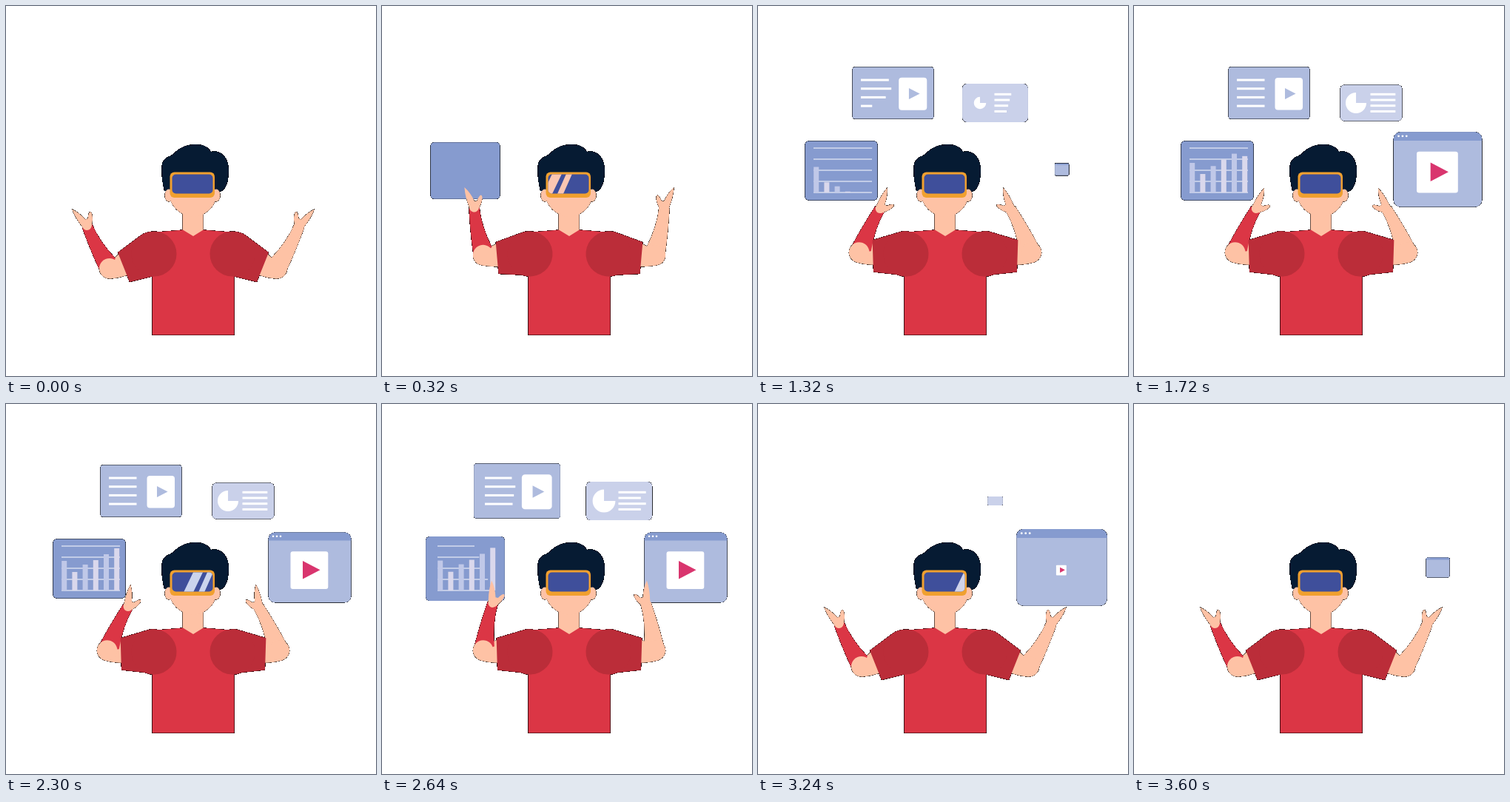
Recreate the animation shown at these times as an HTML page. Size 500 by 500 pixels, loop 3.62 s.

```html
<!DOCTYPE html>
<html lang="en">
<head>
<meta charset="utf-8">
<title>Headset</title>
<style>
html, body { margin: 0; width: 100%; height: 100%; overflow: hidden; background: #fff; }
svg { display: block; width: 100vw; height: 100vh; }
</style>
</head>
<body>
<svg viewBox="0 0 500 500">
  <defs>
    <clipPath id="lens"><rect x="224.5" y="227.5" width="55" height="26" rx="5"/></clipPath>
    <!-- Half-covered edge pixels sit on a hard black mask -->
    <filter id="edge" filterUnits="userSpaceOnUse" x="0" y="0" width="500" height="500" color-interpolation-filters="sRGB">
      <feComponentTransfer in="SourceAlpha" result="mask">
        <feFuncA type="discrete" tableValues="0 1 1 1 1 1 1"/>
      </feComponentTransfer>
      <feMerge><feMergeNode in="mask"/><feMergeNode in="SourceGraphic"/></feMerge>
    </filter>
  </defs>
  <g filter="url(#edge)">
    <g id="panels"></g>
    <path fill="#fec2a5" d="M238.6 270H266.6V304L253 312L238.6 304Z"/>
    <path fill="#db3645" d="M239 302.5L197.7 306V444.4H308.4V306L266.6 302.5L253 311Z"/>
    <g id="arms"></g>
    <path fill="#061b33" d="M214 250C211 236 208 216 213 209C217 203 222 204 226 200C236 190 246 187 256 187C266 187 273 190 277 197C290 194 300 204 301 220C301 238 297 250 288 251Z"/>
    <g fill="#fec2a5">
      <ellipse cx="220" cy="256" rx="5.5" ry="8.5"/>
      <ellipse cx="284" cy="256" rx="5.5" ry="8.5"/>
      <path d="M222 250V262C226 275 241 285 253 285C265 285 280 275 283 262V250Z"/>
    </g>
    <rect x="221.5" y="224.5" width="60.5" height="34.5" rx="6" fill="#f0a02f"/>
    <rect x="224.5" y="227.5" width="55" height="26" rx="5" fill="#3f4f9b"/>
    <g clip-path="url(#lens)">
      <path id="glint" d="M0 227H13L0 254H-13ZM19 227H27L15 254H7Z"/>
    </g>
  </g>
</svg>
<script>
const LOOP = 3620, STEP = 20;
const SKIN = '#fec2a5', MID = '#869bcf', SOFT = '#aebbde', PALE = '#cad1ea';
const $ = id => document.getElementById(id);

// Eased value through [time, value] keys
function at(t, keys) {
  if (t <= keys[0][0]) return keys[0][1];
  for (let i = 1; i < keys.length; i++) {
    const [a, u] = keys[i - 1], [b, v] = keys[i];
    if (t < b) {
      const x = (t - a) / (b - a);
      return u + (v - u) * x * x * (3 - 2 * x);
    }
  }
  return keys[keys.length - 1][1];
}

// Grow past full size, settle, swell again, shrink away
const pop = (start, end, settle = 170, fall = 400, peak = 1.1) => [
  [start, 0], [start + 400, peak], [start + 400 + settle, 1],
  [end - settle, 1], [end, peak], [end + fall, 0]
];

const parts = [];
let markup = '';

// axis: which directions scale around (cx, cy)
function part(shape, cx, cy, keys, axis = 'xy') {
  parts.push({ cx, cy, keys, axis });
  markup += `<g>${shape}</g>`;
}
const box = (x, y, w, h, fill, rx = 0) =>
  `<rect x="${x}" y="${y}" width="${w}" height="${h}" rx="${rx}" fill="${fill}"/>`;
const path = (d, fill) => `<path d="${d}" fill="${fill}"/>`;
const line = (x, y, w, h, fill, keys) => part(box(x, y - h / 2, w, h, fill), x, y, keys, 'x');

// Bar chart
part(box(63.6, 182.6, 97.8, 79.8, MID, 5), 112.5, 222.5, pop(10, 2710, 390, 540));
for (let i = 0; i < 5; i++)
  line(75, 192 + 15 * i, 79, 1.7, '#cdd5ec', pop(768 - 58 * i, 2460 + 20 * i));
[40, 25, 35, 41, 49, 57].forEach((h, i) =>
  part(box(75.2 + 14.2 * i, 252 - h, 7, h, i % 2 ? '#dad8ec' : '#c0c8e8'), 0, 252,
    pop(1040 + 80 * i, 2775), 'y'));

// Article with clip
part(box(127.6, 82.6, 109.8, 69.8, SOFT, 3.5), 182.5, 117.5, pop(365, 2800, 390, 440));
for (let i = 0; i < 4; i++)
  line(139, 100 + 11.7 * i, 37.5, 3, '#fff', pop(780 + 125 * i, 2555 + 88 * i));
part(box(190.5, 97, 37.5, 43.5, '#fff', 4) + path('M204 111V126L218.5 118.5Z', SOFT),
  209.3, 118.7, pop(790, 2680));

// Pie card
part(box(278.6, 106.6, 83.8, 48.8, PALE, 6), 320.5, 131, pop(755, 2790, 390, 650));
part(path('M300 131V117A14 14 0 1 0 314 131Z', '#fff'), 300, 131, pop(1110, 2640));
for (let i = 0; i < 4; i++)
  line(319.5, 119.3 + 7.7 * i, 33.8, 3, '#fff', pop(1090 + 15 * i, i % 2 ? 2530 : 2650));

// Video window
part(box(354.6, 173.5, 111.8, 94.8, SOFT, 9) +
  path('M354.6 184.5V182.5A9 9 0 0 1 363.6 173.5H457.4A9 9 0 0 1 466.4 182.5V184.5Z', MID) +
  [361, 366, 371].map(x => `<circle cx="${x}" cy="178.7" r="1.3" fill="#fff"/>`).join(''),
  410.6, 220.9, pop(1220, 3220, 270, 570));
part(box(384.5, 199.2, 50.8, 50.8, '#fff', 3), 409.8, 224.6, pop(1330, 2970));
part(path('M401 212V236.5L424.5 224.2Z', '#d9356e'), 411, 224.4, pop(1380, 2975));

$('panels').innerHTML = markup;
const nodes = [...$('panels').children];

const arm = (cloth, flip) => `<g transform="${flip}"><g class="shoulder">
  ${path('M146 341L160 328L172 361Q152 368.5 140 368.5Z', SKIN)}
  <g class="elbow">
    ${path('M103 300L116 294Q126 318 148 341L140 355L126 356Q114 330 103 300Z', cloth)}
    <g class="wrist">${path('M89 274.5Q99 279 107.5 288.5L110.5 287Q111.5 278 114 278Q117 279 117 289L116 296Q115 303 109.5 303Q105 303 102 297Q94 287 89 274.5Z', SKIN)}</g>
  </g>
  <circle cx="139.8" cy="354.8" r="13.8" fill="${SKIN}"/>
  <g fill="#bb2d39"><path d="M200 305Q188 305 182 310L151 333L167 373L200 365Z"/><circle cx="200" cy="335" r="30.5"/></g>
</g></g>`;
$('arms').innerHTML = arm('#db3645', '') + arm(SKIN, 'translate(506 0) scale(-1 1)');

const joints = [
  ['shoulder', 200, 335, [[0, 0], [430, 20], [2660, 20], [3090, 0]]],
  ['elbow', 140, 355, [[300, 0], [800, 33], [2380, 33], [2960, 0]]],
  ['wrist', 110, 297, [[320, 0], [850, 5], [1720, 11], [2300, -4], [2940, 4], [3300, 0]]]
].map(([name, x, y, keys]) =>
  ({ els: document.querySelectorAll('#arms .' + name), x, y, keys }));

const sweeps = [[140, '#fbc6b2'], [2000, '#cbd4ed'], [2810, '#d0d3ea']];

function draw(t) {
  parts.forEach(({ cx, cy, keys, axis }, i) => {
    const s = at(t, keys);
    const sx = axis === 'y' ? 1 : s, sy = axis === 'x' ? 1 : s;
    nodes[i].setAttribute('visibility', s > 0.01 ? 'visible' : 'hidden');
    nodes[i].setAttribute('transform',
      `translate(${cx} ${cy}) scale(${sx} ${sy}) translate(${-cx} ${-cy})`);
  });
  for (const { els, x, y, keys } of joints) {
    const turn = `rotate(${at(t, keys)} ${x} ${y})`;
    els.forEach(el => el.setAttribute('transform', turn));
  }
  const sweep = sweeps.find(([s]) => t >= s && t < s + 500);
  $('glint').setAttribute('visibility', sweep ? 'visible' : 'hidden');
  if (sweep) {
    $('glint').setAttribute('fill', sweep[1]);
    $('glint').setAttribute('transform', `translate(${195 + 97 * (t - sweep[0]) / 500} 0)`);
  }
}

const begin = performance.now();
function tick() {
  const t = (performance.now() - begin) % LOOP;
  draw(Math.floor(t / STEP) * STEP);
  requestAnimationFrame(tick);
}
draw(0);
requestAnimationFrame(tick);
</script>
</body>
</html>
```
